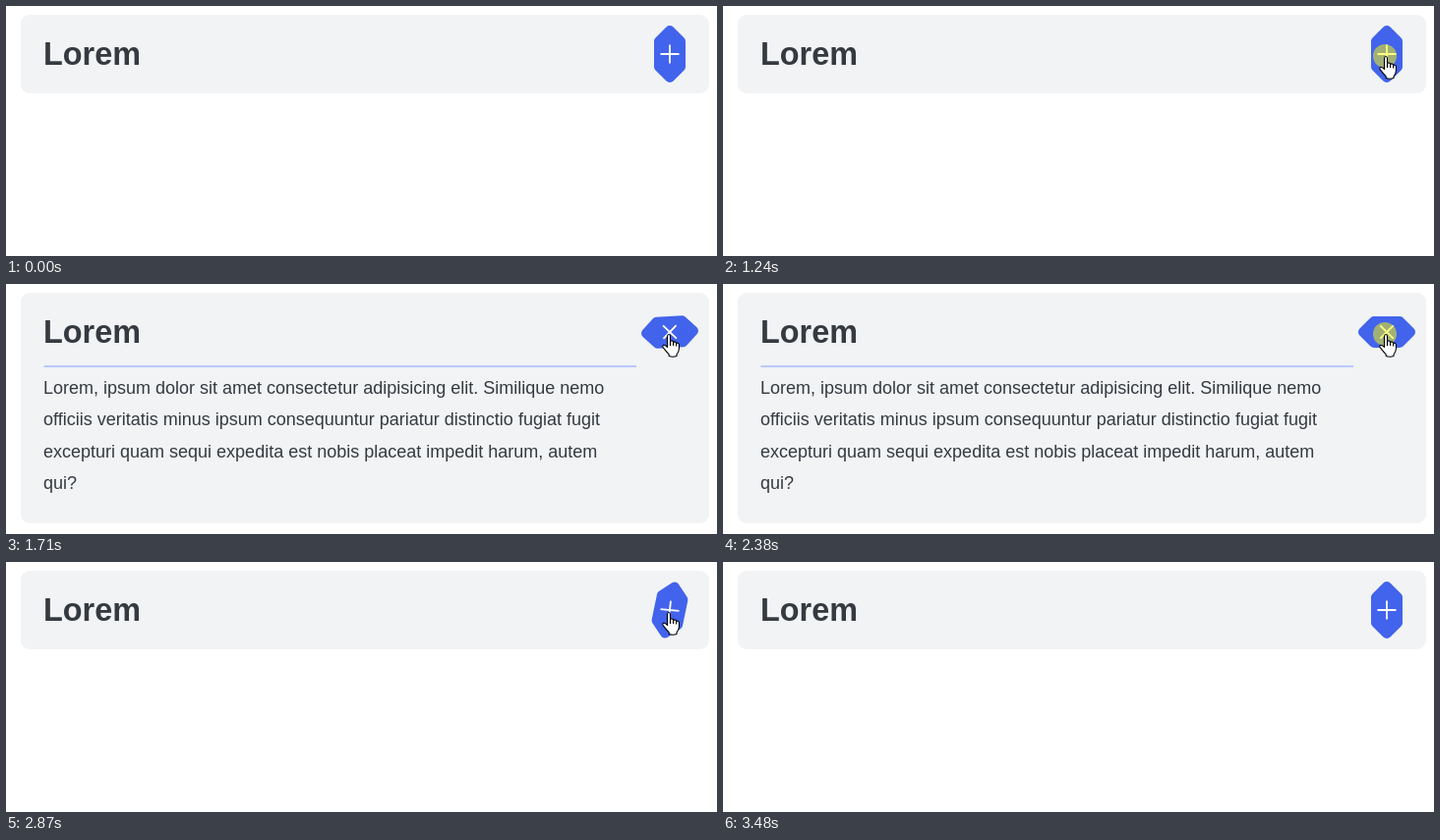
An HTML page that plays this animation: 723x255 px, repeating every 3.88 s.

```html
<!DOCTYPE html>
<html lang="en">
<head>
<meta charset="utf-8">
<title>Accordion</title>
<style>
  html, body { margin: 0; width: 100%; height: 100%; overflow: hidden; background: #fff; }
  svg { display: block; }
  text { font: 18px "Liberation Sans", Arial, sans-serif; fill: #343a40; }
  .title { font-size: 32.4px; font-weight: bold; }
  .cursor { fill: #fff; stroke: #000; stroke-width: 1.1; stroke-linejoin: round; }
</style>
</head>
<body>
<svg width="723" height="255" viewBox="0 0 723 255">
  <rect id="card" x="15" y="9" width="700" height="80" rx="9" fill="#f1f3f5"/>
  <text class="title" x="38" y="60">Lorem</text>
  <g id="body">
    <rect x="38.5" y="83" width="602.5" height="2" fill="#bac8ff"/>
    <text x="38" y="112">Lorem, ipsum dolor sit amet consectetur adipisicing elit. Similique nemo</text>
    <text x="38" y="144.4">officiis veritatis minus ipsum consequuntur pariatur distinctio fugiat fugit</text>
    <text x="38" y="176.8">excepturi quam sequi expedita est nobis placeat impedit harum, autem</text>
    <text x="38" y="209.2">qui?</text>
  </g>
  <g transform="translate(675 49)">
    <path id="hex" d="M0-24L11-13V13L0 24L-11 13V-13Z" fill="#4263eb" stroke="#4263eb" stroke-width="10" stroke-linejoin="round"/>
    <path id="plus" d="M-9.5 0H9.5M0-9.5V9.5" stroke="#fff" stroke-width="1.8"/>
  </g>
  <circle id="click" cx="673" cy="51" r="12" fill="#ff0" fill-opacity=".5"/>
  <g id="pointer" class="cursor">
    <path id="arrow" d="M.5.5V16.6L4.2 13.2L6.7 18.8L9 17.8L6.6 12.2H11.6Z"/>
    <g id="hand" transform="translate(-6 0)">
      <path d="M5.5 2.5Q5.5.5 7 .5T8.5 2.5V7.5Q9.2 6.6 10.4 7T11.6 8.6Q12.4 7.6 13.5 8.1T14.6 9.6Q15.5 8.8 16.5 9.4T17.4 11.3V15Q17.2 18.5 15 20.8V22.5Q11 24 7.2 22.5V20.8Q4.5 18 1.1 13.6Q.3 12 1.5 11.3Q3 10.8 5.5 13.5Z"/>
      <path d="M8.5 7.5V12M11.6 8.6V12M14.6 9.6V12.5" fill="none"/>
    </g>
  </g>
</svg>
<script>
const LOOP = 3880, STEP = LOOP / 57, TURN = 500;
const $ = id => document.getElementById(id);
const show = (id, on) => $(id).setAttribute("visibility", on ? "visible" : "hidden");
const within = (t, from, to) => t >= from && t < to;

// Pointer path: time, x, y
const path = [
  [260, 679, 195], [400, 674, 134], [540, 670, 89], [610, 670, 77], [680, 670, 67],
  [750, 672, 60], [820, 673, 51], [3080, 673, 51], [3150, 673, 56], [3210, 675, 74],
  [3280, 680, 112], [3350, 685, 168], [3410, 689, 226], [3480, 690, 270]
];

function pointerAt(t) {
  const i = Math.max(1, path.findIndex(p => p[0] >= t));
  const [t0, x0, y0] = path[i - 1], [t1, x1, y1] = path[i];
  const k = Math.max(0, (t - t0) / (t1 - t0));
  return [x0 + (x1 - x0) * k, y0 + (y1 - y0) * k];
}

// CSS "ease": cubic-bezier(.25, .1, .25, 1)
function ease(x) {
  if (x <= 0 || x >= 1) return x <= 0 ? 0 : 1;
  const bezier = (s, a, b) => 3 * s * (1 - s) ** 2 * a + 3 * s * s * (1 - s) * b + s ** 3;
  let lo = 0, hi = 1;
  for (let i = 0; i < 20; i++) {
    const mid = (lo + hi) / 2;
    if (bezier(mid, .25, .25) < x) lo = mid; else hi = mid;
  }
  return bezier(lo, .1, 1);
}

function draw(now) {
  const t = now % LOOP;
  // Motion advances in even steps of about 68 ms
  const m = Math.floor((t + 14) / STEP) * STEP;

  const open = within(t, 1370, 2580);
  $("card").setAttribute("height", open ? 235 : 80);
  show("body", open);

  const turn = t < 1370 ? 0 : ease((m - 1320) / TURN) - ease((m - 2570) / TURN);
  $("hex").setAttribute("transform", `rotate(${90 * turn})`);
  $("plus").setAttribute("transform", `rotate(${45 * turn})`);

  show("click", within(t, 1240, 1370) || within(t, 2380, 2580));

  const visible = within(t, 260, 3480);
  if (visible) {
    const [x, y] = pointerAt(Math.min(m, 3480));
    $("pointer").setAttribute("transform", `translate(${Math.round(x)} ${Math.round(y)})`);
    show("hand", y < 74);
    show("arrow", y >= 74);
  }
  $("pointer").style.display = visible ? "" : "none";
}

const start = performance.now();
(function tick() {
  draw(performance.now() - start);
  requestAnimationFrame(tick);
})();
</script>
</body>
</html>
```
